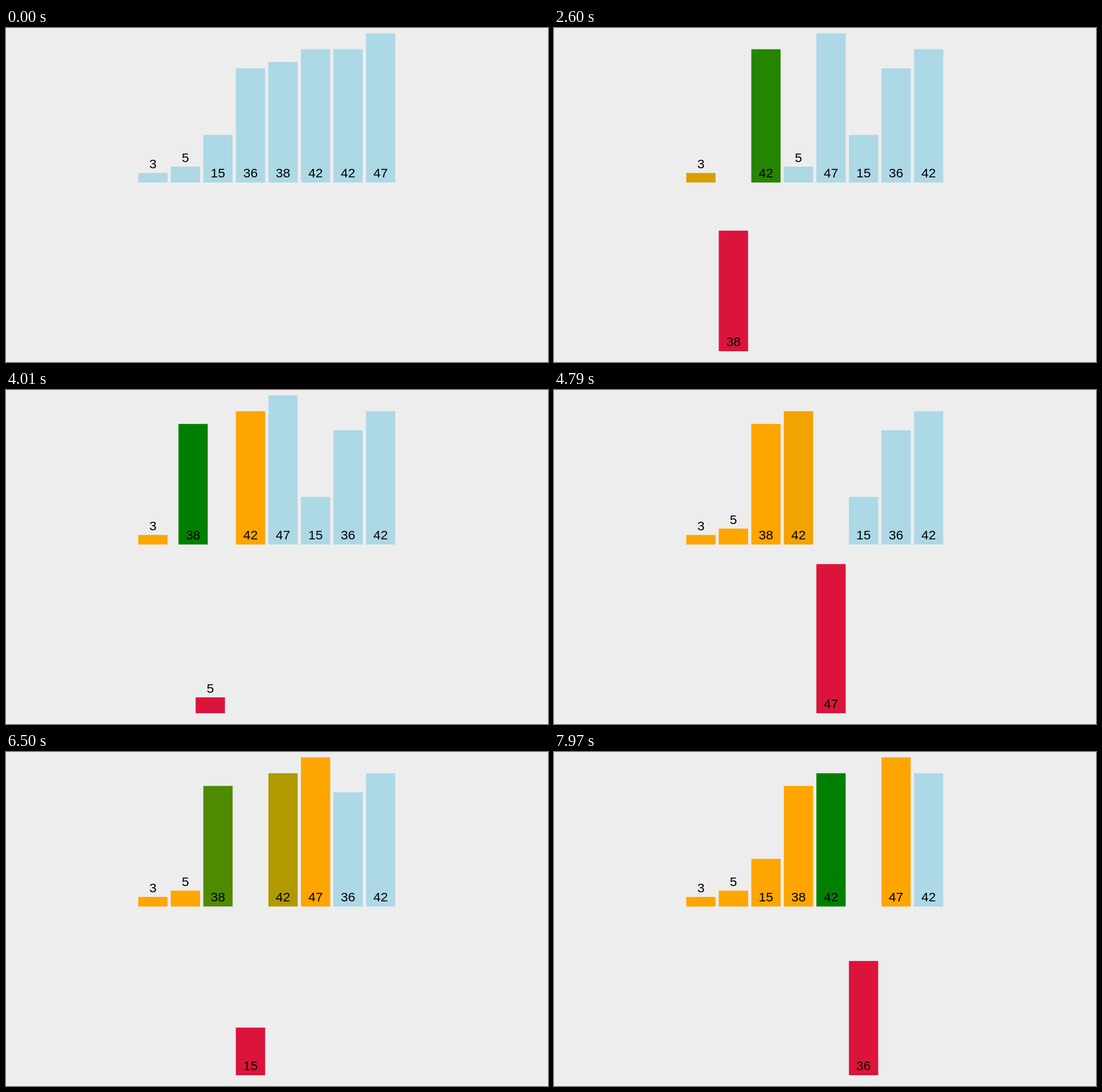
Recreate the animation shown at these times as an HTML page. Size 952 by 588 pixels, loop 8 s.

```html
<!DOCTYPE html>
<html lang="en">
<head>
<meta charset="utf-8">
<title>Insertion sort</title>
<style>
  html, body { margin: 0; width: 100%; height: 100%; overflow: hidden; background: #ededed; }
  svg { display: block; width: 952px; height: 588px; }
  text { font: 22.86px Arial, "Liberation Sans", sans-serif; text-anchor: middle; fill: #000; }
</style>
</head>
<body>
<svg id="stage" viewBox="0 0 952 588"></svg>
<script>
const LOOP = 8000;
const LEFT = 232.3, STEP = 57.14, WIDTH = 51.43, BASE = 272, DROP = 297, UNIT = 5.586;
const BLUE = [173, 216, 230], RED = [220, 20, 60], GREEN = [0, 128, 0], ORANGE = [255, 165, 0];

const values = [3, 42, 38, 5, 47, 15, 36, 42];
const sortedSlots = [0, 5, 4, 1, 7, 2, 3, 6];

// start, duration, actions on bars (numbered by their unsorted place)
const script = `
  480 300 shuffle
  790 300 done:0
  1111 275 fall:1
  1386 250 mark:0
  1632 280 rise:1 done:0
  1915 290 fall:2 mark:1
  2210 290 swap:1:2
  2508 280 mark:0 done:1
  2640 230 rise:2
  2790 275 done:0
  2850 265 fall:3
  3110 260 mark:1
  3370 270 swap:1:3
  3640 260 mark:2 done:1
  3902 280 swap:2:3
  4180 170 mark:0 done:2
  4300 200 rise:3
  4350 170 done:0
  4460 270 fall:4
  4730 270 mark:1
  5003 270 rise:4 done:1
  5280 275 fall:5 mark:4
  5555 265 swap:4:5
  5820 260 mark:1 done:4
  6080 265 swap:1:5
  6345 272 mark:2 done:1
  6617 270 swap:2:5
  6890 200 mark:3 done:2
  7000 200 rise:5 done:3
  7190 260 fall:6
  7440 200 mark:4
  7620 230 swap:4:6
  7740 240 mark:1 done:4`;

const NS = "http://www.w3.org/2000/svg";
const stage = document.getElementById("stage");
const make = (tag, parent) => parent.appendChild(document.createElementNS(NS, tag));

const bars = values.map((value, i) => {
  const group = make("g", stage);
  const rect = make("rect", group);
  const label = make("text", group);
  const height = value * UNIT;
  rect.setAttribute("width", WIDTH);
  rect.setAttribute("height", height);
  rect.setAttribute("y", -height);
  label.setAttribute("x", WIDTH / 2);
  label.setAttribute("y", height < 40 ? -height - 8.4 : -9);
  label.textContent = value;
  return {
    group, rect, slot: i,
    x: { from: [sortedSlots[i]], moves: [] },
    y: { from: [0], moves: [] },
    fill: { from: BLUE, moves: [] }
  };
});

const actions = {
  shuffle: go => bars.forEach((bar, i) => go(bar.x, [i])),
  done: (go, a) => go(bars[a].fill, ORANGE),
  mark: (go, a) => go(bars[a].fill, GREEN),
  fall: (go, a) => { go(bars[a].y, [1]); go(bars[a].fill, RED); },
  rise: (go, a) => { go(bars[a].y, [0]); go(bars[a].fill, ORANGE); },
  swap: (go, a, b) => {
    const p = bars[a], q = bars[b];
    [p.slot, q.slot] = [q.slot, p.slot];
    go(p.x, [p.slot]);
    go(q.x, [q.slot]);
  }
};

for (const line of script.trim().split("\n")) {
  const [start, time, ...calls] = line.trim().split(" ");
  const go = (track, to) => track.moves.push({ start: +start, time: +time, to });
  for (const call of calls) {
    const [name, ...ids] = call.split(":");
    actions[name](go, ...ids);
  }
}

const ease = t => t < 0.5 ? 4 * t ** 3 : 1 - 4 * (1 - t) ** 3;

function valueAt(track, now) {
  let value = track.from;
  for (const { start, time, to } of track.moves) {
    if (now <= start) break;
    const k = ease(Math.min(1, (now - start) / time));
    value = value.map((v, i) => v + (to[i] - v) * k);
  }
  return value;
}

function draw(now) {
  for (const bar of bars) {
    const x = LEFT + valueAt(bar.x, now)[0] * STEP;
    const y = BASE + valueAt(bar.y, now)[0] * DROP;
    bar.group.setAttribute("transform", `translate(${x.toFixed(2)} ${y.toFixed(2)})`);
    bar.rect.setAttribute("fill", `rgb(${valueAt(bar.fill, now).map(Math.round)})`);
  }
}

const began = performance.now();
function frame() {
  draw((performance.now() - began) % LOOP);
  requestAnimationFrame(frame);
}
frame();
</script>
</body>
</html>
```
